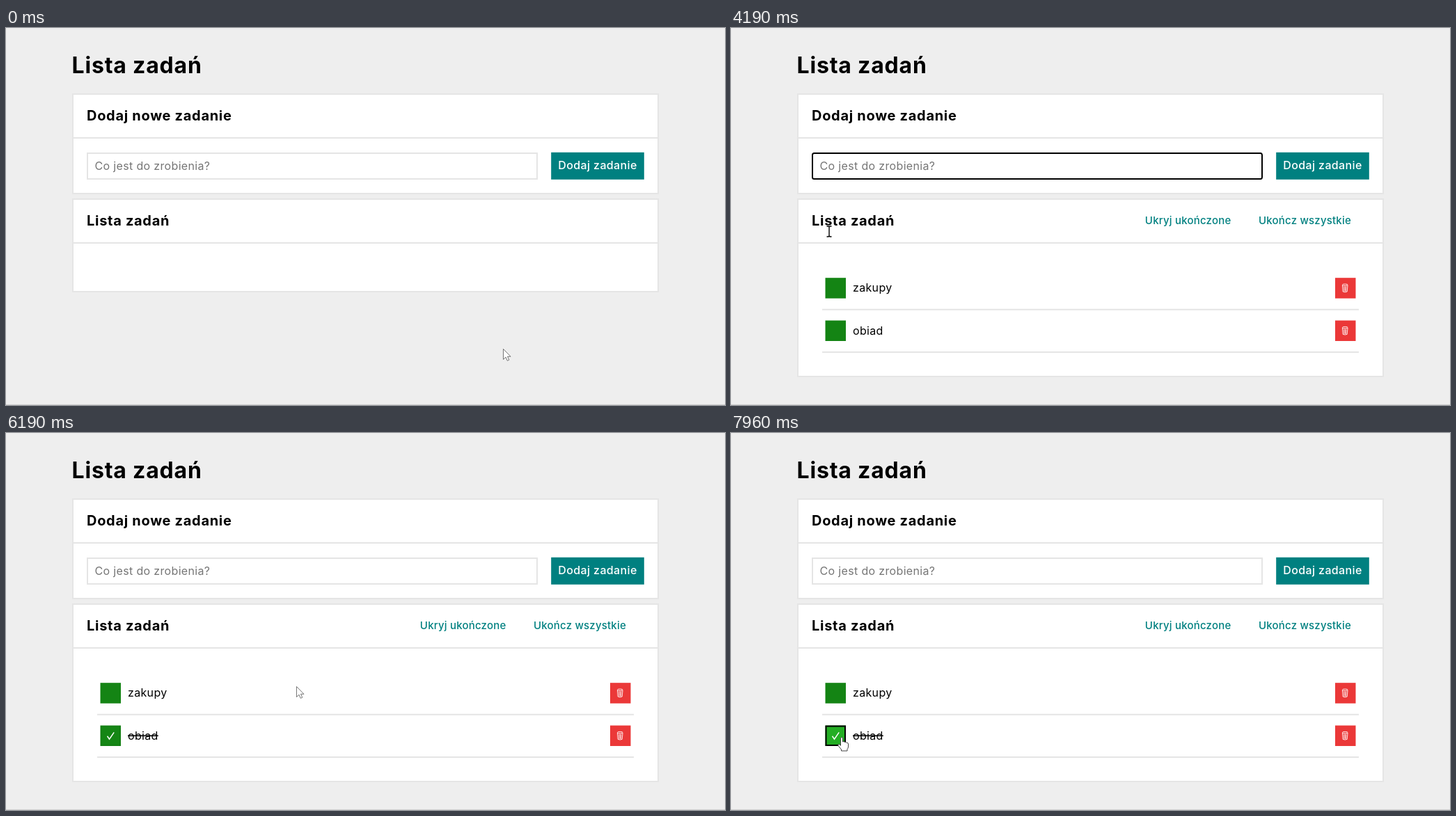
An HTML page for the animation above (8 s loop, 1033x542 px).

```html
<!DOCTYPE html>
<html lang="pl">
<head>
<meta charset="utf-8">
<title>Lista zadań</title>
<style>
  html, body { margin: 0; width: 100%; height: 100%; overflow: hidden; background: #eee; }
  svg { display: block; width: 100%; height: 100%; }
  text { font: 400 16px Inter, "Open Sans", sans-serif; letter-spacing: .34px; white-space: pre; }
  .title { font-size: 32px; font-weight: 700; letter-spacing: .8px; }
  .head { font-size: 20px; font-weight: 700; letter-spacing: .7px; }
  .button { font-size: 16px; font-weight: 500; letter-spacing: .38px; fill: #fff; }
  .link { font-size: 15px; font-weight: 500; letter-spacing: .2px; fill: #008080; }
  .panel { fill: #fff; stroke: #e5e5e5; stroke-width: 2; }
  .rule { stroke: #e5e5e5; stroke-width: 2; }
  .done { text-decoration: line-through; }
  .hint { fill: #757575; }
</style>
</head>
<body>
<svg viewBox="0 0 1033 542">
  <defs>
    <g id="row">
      <path class="rule" d="M131 404.7H902"/>
      <rect x="868" y="359.2" width="29.5" height="29.5" fill="#eb3838"/>
      <g fill="none" stroke="#fff" stroke-width=".9">
        <ellipse cx="882.2" cy="369.3" rx="3.9" ry="1.2"/>
        <path d="M878.4 369.8l.8 9.2q3 1.5 6 0l.8-9.2"/>
        <path d="M880.6 371.5l.3 7M882.2 371.5v7M883.8 371.5l-.3 7" stroke-width=".8"/>
      </g>
    </g>
  </defs>
  <rect width="1033" height="542" fill="#eee"/>
  <path d="M0 541.5H1033" stroke="#d0d0d0"/>
  <text class="title" x="94.6" y="65.2">Lista zadań</text>

  <rect class="panel" x="96" y="95" width="841" height="143"/>
  <path class="rule" d="M96 158H937"/>
  <text class="head" x="116" y="133.3">Dodaj nowe zadanie</text>
  <rect id="field" x="117" y="180" width="646" height="37" fill="#fff" stroke-width="2"/>
  <text id="entry" x="127.5" y="203.6"></text>
  <rect id="caret" y="189" width="1" height="19"/>
  <rect x="783.2" y="178.8" width="133.6" height="39" fill="#008080"/>
  <text class="button" x="793.3" y="203.3">Dodaj zadanie</text>

  <rect id="list" class="panel" x="96" y="246" width="841" height="133"/>
  <path class="rule" d="M96 309H937"/>
  <text class="head" x="116" y="283.8">Lista zadań</text>
  <g id="links">
    <text id="toggle" class="link" x="718.4" y="282.4" text-anchor="end"></text>
    <text class="link" x="758" y="282.4">Ukończ wszystkie</text>
  </g>

  <g id="first">
    <use href="#row"/>
    <rect x="135.5" y="359.2" width="29.5" height="29.5" fill="#148414"/>
    <text x="175" y="379.3">zakupy</text>
  </g>
  <g id="second" transform="translate(0 61.3)">
    <use href="#row"/>
    <rect id="box" x="135.5" y="359.2" width="29.5" height="29.5"/>
    <rect id="ring" x="136.5" y="360.2" width="27.5" height="27.5" fill="none" stroke="#000" stroke-width="2"/>
    <path id="tick" d="M145.5 374.5l3 4.3 6.7-9.8" fill="none" stroke="#fff" stroke-width="1.5"/>
    <text id="task" x="175" y="379.3">obiad</text>
  </g>

  <circle id="press" r="10" fill="#e6f000" fill-opacity=".55"/>
  <g id="cursor" stroke-linejoin="round">
    <path id="arrow" d="M.5 .5V15.5L4 12.2 6.3 17.3 8.8 16.2 6.5 11.3H11Z" fill="#fff" stroke="#666" stroke-width=".9"/>
    <g id="beam" fill="none">
      <path d="M-3.5-7.5h2.5l1 1 1-1h2.5M0-6.5v13M-3.5 7.5h2.5l1-1 1 1h2.5" stroke="#fff" stroke-width="3"/>
      <path d="M-3.5-7.5h2.5l1 1 1-1h2.5M0-6.5v13M-3.5 7.5h2.5l1-1 1 1h2.5" stroke="#000" stroke-width="1.4"/>
    </g>
    <path id="hand" fill="#fff" stroke="#444" d="M-1.5 1.5Q0-.5 1.5 1.5V7Q3.5 5.7 4.3 7.5 6.3 6.5 7 8.3 9.3 7.7 9.5 10V14Q9.3 16.5 8 17.5V20H-.5V18L-5 12.5Q-5.7 10-3.5 10.5L-1.5 12.3Z"/>
  </g>
</svg>
<script>
const LOOP = 8000;
const $ = id => document.getElementById(id);
const show = (id, on) => $(id).style.display = on ? "" : "none";
const clamp = v => Math.max(0, Math.min(1, v));
const ramp = (t, a, b) => clamp((t - a) / (b - a));
const mix = (a, b, k) => `rgb(${a.map((v, i) => Math.round(v + (b[i] - v) * k))})`;

// [time, x, y]
const path = [
  [0, 714, 461], [30, 714, 461], [690, 243, 205], [4040, 243, 205], [4190, 141, 292],
  [4430, 146, 415], [4650, 152, 453], [4890, 155, 444], [5490, 155, 441], [5840, 156, 440],
  [5960, 156, 440], [6440, 709, 279], [7010, 709, 279], [7160, 704, 278], [7380, 704, 278],
  [7900, 159, 437], [LOOP, 159, 437]
];
// [time, text]
const typed = [
  [0, ""], [990, "z"], [1140, "za"], [1290, "zak"], [1520, "zaku"], [1720, "zakup"], [1930, "zakupy"],
  [2380, ""], [2680, "o"], [2930, "ob"], [3000, "obi"], [3150, "obia"], [3350, "obiad"], [3610, ""]
];
const presses = [[690, 790], [4790, 5540], [6750, 6850], [7360, 7420]];
const within = (t, a, b) => t >= a && t < b;

function place(t) {
  const i = path.findIndex(p => p[0] > t);
  const [a, b] = [path[i - 1], path[i]];
  let k = ramp(t, a[0], b[0]);
  if (b[0] - a[0] > 400) k = k * k * (3 - 2 * k);
  return [a[1] + (b[1] - a[1]) * k, a[2] + (b[2] - a[2]) * k];
}

function shape(x, y) {
  const inField = x > 116 && x < 764 && y > 179 && y < 218;
  const inHeading = x > 116 && x < 232 && y > 265 && y < 293;
  if (inField || inHeading) return "beam";
  const inBox = x > 135 && x < 165 && (within(y, 359, 389) || within(y, 420, 451));
  return inBox ? "hand" : "arrow";
}

function draw(t) {
  const focus = within(t, 690, 4790);
  const field = $("field");
  field.setAttribute("stroke", focus ? "#000" : "#e5e5e5");
  field.setAttribute("rx", focus ? 2.5 : 0);

  const word = typed.filter(e => e[0] <= t).pop()[1];
  const entry = $("entry");
  entry.textContent = word || "Co jest do zrobienia?";
  entry.setAttribute("class", word ? "" : "hint");
  show("caret", within(t, 690, 3890));
  $("caret").setAttribute("x", word ? Math.round(127.5 + entry.getComputedTextLength()) : 128);

  const hidden = within(t, 6850, 7400);
  const first = t >= 2380, second = t >= 3610 && !hidden;
  show("links", first);
  show("first", first);
  show("second", second);
  $("list").setAttribute("height", second ? 255 : first ? 194 : 133);

  $("toggle").textContent = (hidden ? "Pokaż" : "Ukryj") + " ukończone";
  const glow = ramp(t, 6340, 6440) - ramp(t, 7420, 7560);
  $("toggle").style.fill = mix([0, 128, 128], [20, 178, 178], glow);

  const done = t >= 5490;
  show("tick", done);
  $("task").setAttribute("class", done ? "done" : "");
  const hover = ramp(t, 4890, 5240) - ramp(t, 6000, 6200) + ramp(t, 7780, 7940);
  $("box").setAttribute("fill", mix([20, 132, 20], [36, 174, 36], hover));
  $("ring").style.opacity = hover;

  const [x, y] = place(t);
  const kind = shape(x, y);
  for (const id of ["arrow", "beam", "hand"]) show(id, id === kind);
  $("cursor").setAttribute("transform", `translate(${x} ${y})`);
  show("press", presses.some(p => within(t, p[0], p[1])));
  $("press").setAttribute("cx", x);
  $("press").setAttribute("cy", y);
}

const start = performance.now();
function tick(now) {
  draw(Math.max(0, now - start) % LOOP);
  requestAnimationFrame(tick);
}
draw(0);
requestAnimationFrame(tick);
</script>
</body>
</html>
```
